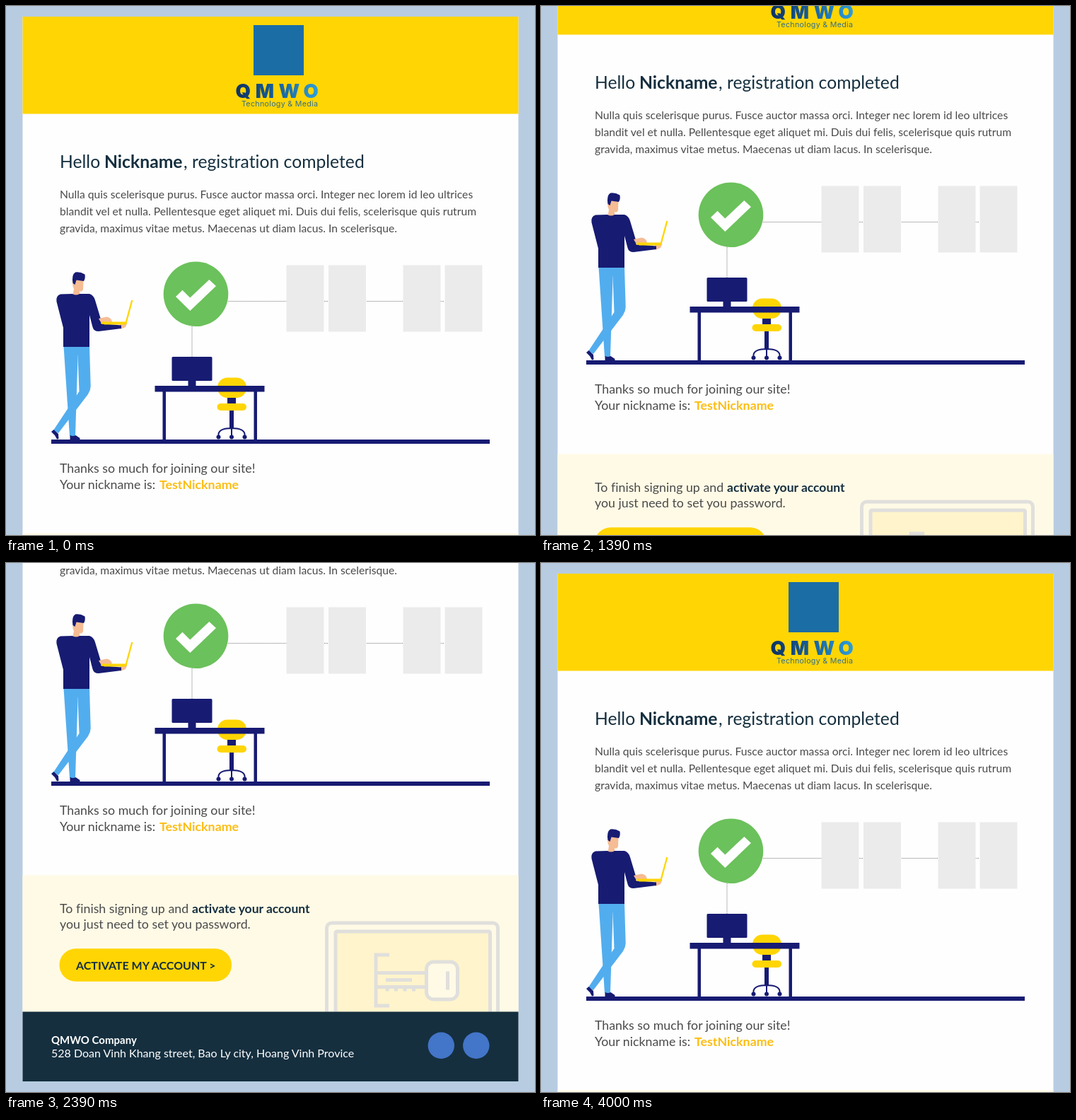
An HTML page for the animation above (5.31 s loop, 748 px wide and 748 px high).

```html
<!DOCTYPE html>
<html lang="en">
<head>
<meta charset="utf-8">
<title>Registration mail</title>
<style>
html, body { margin: 0; width: 100%; height: 100%; overflow: hidden; background: #b8cce1; }
svg { display: block; width: 748px; height: 748px; font-family: Lato, sans-serif; font-variant-ligatures: none; }
#page { animation: scroll 5310ms step-end infinite; }
@keyframes scroll {
  0% { transform: translateY(0); }
  24.48% { transform: translateY(-22.5px); }
  26.17% { transform: translateY(-112px); }
  28.05% { transform: translateY(-205px); }
  29.94% { transform: translateY(-280.5px); }
  41.24% { transform: translateY(-288px); }
  43.12% { transform: translateY(-298px); }
  45% { transform: translateY(-304px); }
  65.91% { transform: translateY(-256px); }
  67.79% { transform: translateY(-210px); }
  69.67% { transform: translateY(-163px); }
  71.56% { transform: translateY(-117px); }
  73.44% { transform: translateY(-56px); }
  75.32%, 100% { transform: translateY(0); }
}
.title { font-size: 24.7px; fill: #152f3f; }
.body { font-size: 15.67px; fill: #4a4a4a; }
.lead { font-size: 17.8px; fill: #4a4a4a; }
.bold { font-weight: 700; }
.dark { fill: #152f3f; }
.gold { fill: #fdbd13; }
.button { font-size: 16px; }
.foot { font-size: 16px; fill: #fff; }
.brand { font: 900 27.5px Inter, sans-serif; letter-spacing: 6.5px; fill: url(#blues); }
.tagline { font: 10.7px Inter, sans-serif; letter-spacing: .3px; fill: #2f6f8c; }
.navy { fill: #171b72; }
.blue { fill: #52adee; }
.skin { fill: #f6bc94; }
.yellow { fill: #ffd504; }
.panel { fill: #ebebeb; }
.dots { stroke: #777; stroke-dasharray: 1 1; }
.line { fill: none; stroke: #e0dfdc; stroke-width: 5; }
</style>
</head>
<body>
<svg viewBox="0 0 748 748">
<defs>
  <linearGradient id="blues" gradientUnits="userSpaceOnUse" x1="325" y1="0" x2="442" y2="0">
    <stop offset="0" stop-color="#0d3263"/>
    <stop offset=".5" stop-color="#17619c"/>
    <stop offset="1" stop-color="#2f9fd8"/>
  </linearGradient>
  <clipPath id="band"><rect x="23.5" y="465" width="701" height="193"/></clipPath>
</defs>
<g id="page">
  <!-- header -->
  <rect x="23.5" y="15" width="701" height="1022" fill="#fefefe"/>
  <rect class="yellow" x="23.5" y="15" width="701" height="137.5"/>
  <rect x="350" y="27" width="71" height="71" fill="#1b6da6"/>
  <text class="brand" x="324.5" y="130">QMWO</text>
  <text class="tagline" x="333" y="141.5">Technology &amp; Media</text>

  <!-- greeting -->
  <text class="title" x="76" y="229">Hello <tspan class="bold" x="139">Nickname</tspan><tspan x="251">, </tspan><tspan x="263">registration completed</tspan></text>
  <g class="body">
    <text x="76" y="271.5">Nulla quis scelerisque purus. Fusce auctor massa orci. Integer nec lorem id leo ultrices</text>
    <text x="76" y="295.5">blandit vel et nulla. Pellentesque eget aliquet mi. Duis dui felis, scelerisque quis rutrum</text>
    <text x="76" y="320">gravida, maximus vitae metus. Maecenas ut diam lacus. In scelerisque.</text>
  </g>

  <!-- status line and wall panels -->
  <path class="dots" d="M314 417.5H620M263 453V496"/>
  <g class="panel">
    <rect x="396.5" y="366.5" width="53" height="94"/>
    <rect x="456" y="366.5" width="53" height="94"/>
    <rect x="561.5" y="366.5" width="53" height="94"/>
    <rect x="620.5" y="366.5" width="53" height="94"/>
  </g>
  <circle cx="268.5" cy="407.3" r="45.8" fill="#6bc15b"/>
  <path d="M240 411L249.5 401.8L260.3 412.5L287.3 387L297 396L260.3 431Z" fill="#fff"/>

  <!-- chair -->
  <rect class="yellow" x="299" y="525.5" width="41" height="28.5" rx="14"/>
  <rect class="yellow" x="298.5" y="562" width="41.5" height="10" rx="5"/>
  <path class="navy" d="M313 554h12v8h-12zM316 572h6v26h-6z"/>
  <path d="M300.5 609V605Q302 597 319 597T337.5 605V609M319 597V609" fill="none" stroke="#171b72" stroke-width="2"/>
  <g class="navy">
    <circle cx="300.5" cy="609.5" r="3"/>
    <circle cx="319" cy="609.5" r="3"/>
    <circle cx="337.5" cy="609.5" r="3"/>
  </g>

  <!-- desk, monitor, floor -->
  <g class="navy">
    <rect x="234.5" y="496" width="57" height="34" rx="1.5"/>
    <rect x="257.5" y="529" width="11" height="9"/>
    <rect x="210.5" y="537" width="155" height="8.5"/>
    <rect x="221.5" y="545" width="4.5" height="69"/>
    <rect x="350.5" y="545" width="4.5" height="69"/>
    <rect x="64" y="613" width="620" height="6"/>
  </g>

  <!-- man with laptop -->
  <path class="blue" d="M81.5 481H102L98 608H90Z"/>
  <path class="blue" d="M99.5 481H118L119.7 537Q120 543 116 549L74 604L67 600L103.5 545L101.5 494H99.5Z"/>
  <path class="navy" d="M64 602L67.5 599L74 605L74.5 612L72 612.5L69 607ZM90.5 607Q95 609 98.5 607L104.5 611V613.5H90.5Z"/>
  <path class="skin" d="M95 386L109.5 387L109 401Q107 405 104 403V409H94.5L96 400Q93 395 95 386Z"/>
  <path class="navy" d="M94.5 392Q92.5 380 98 376.5Q105 375.5 111.5 379.5Q112.5 385 110 389L99.5 387.5L97.5 394Z"/>
  <path class="skin" d="M161 449L171.5 448L169 454L162 457Z"/>
  <path class="navy" d="M77 407.5L94 407Q99 410 104 407L118 407Q124 409 126 416L135 446L134 449L163 451.5V456L131 460Q124 460 122.5 454L118 437V482H81V455L71.500 418Q70 410 77 407.5Z"/>
  <path class="skin" d="M131 442L142 439.5Q149 440 150 447H134Z"/>
  <path d="M135 448.5H169.5L178.3 416" fill="none" stroke="#ffd504" stroke-width="2.3"/>
  <path class="yellow" d="M134.5 446.5H171L169 450.5H139Z"/>

  <g class="lead">
    <text x="76" y="660">Thanks so much for joining our site!</text>
    <text x="76" y="682.5">Your nickname is: <tspan class="bold gold" x="217">TestNickname</tspan></text>
  </g>

  <!-- activation band and footer -->
  <g transform="translate(0 280.5)">
    <rect x="23.5" y="465" width="701" height="194" fill="#fffae6"/>
    <g class="line" clip-path="url(#band)">
      <rect x="453.5" y="532.5" width="242" height="150" rx="7"/>
      <rect x="466" y="544.5" width="218.5" height="150" rx="2" fill="#fff4cb"/>
      <path d="M542 577.5H523V649.5H542"/>
      <path d="M525 603H592M525 623H592M537 613H574M539 623V629M551.5 623V629M564 623V629M576.5 623V629"/>
      <rect x="594.5" y="587.5" width="44" height="53" rx="10" fill="#fffae6"/>
      <path d="M624.5 601V627"/>
    </g>
    <g class="lead">
      <text x="76" y="518">To finish signing up and <tspan class="bold dark" x="263" font-size="17.5">activate your account</tspan></text>
      <text x="76" y="540.5">you just need to set you password.</text>
    </g>
    <rect class="yellow" x="75.5" y="568.8" width="243.5" height="46.4" rx="23.2"/>
    <text class="button bold dark" x="99" y="598">ACTIVATE MY ACCOUNT &gt;</text>

    <rect x="23.5" y="658" width="701" height="98.5" fill="#152f3f"/>
    <g class="foot">
      <text class="bold" x="64" y="703" font-size="15">QMWO Company</text>
      <text x="64" y="722.5">528 Doan Vinh Khang street, Bao Ly city, Hoang Vinh Provice</text>
    </g>
    <g fill="#4375c8">
      <circle cx="615.3" cy="705.8" r="18.7"/>
      <circle cx="664.8" cy="705.8" r="18.7"/>
    </g>
  </g>
</g>
</svg>
</body>
</html>
```
